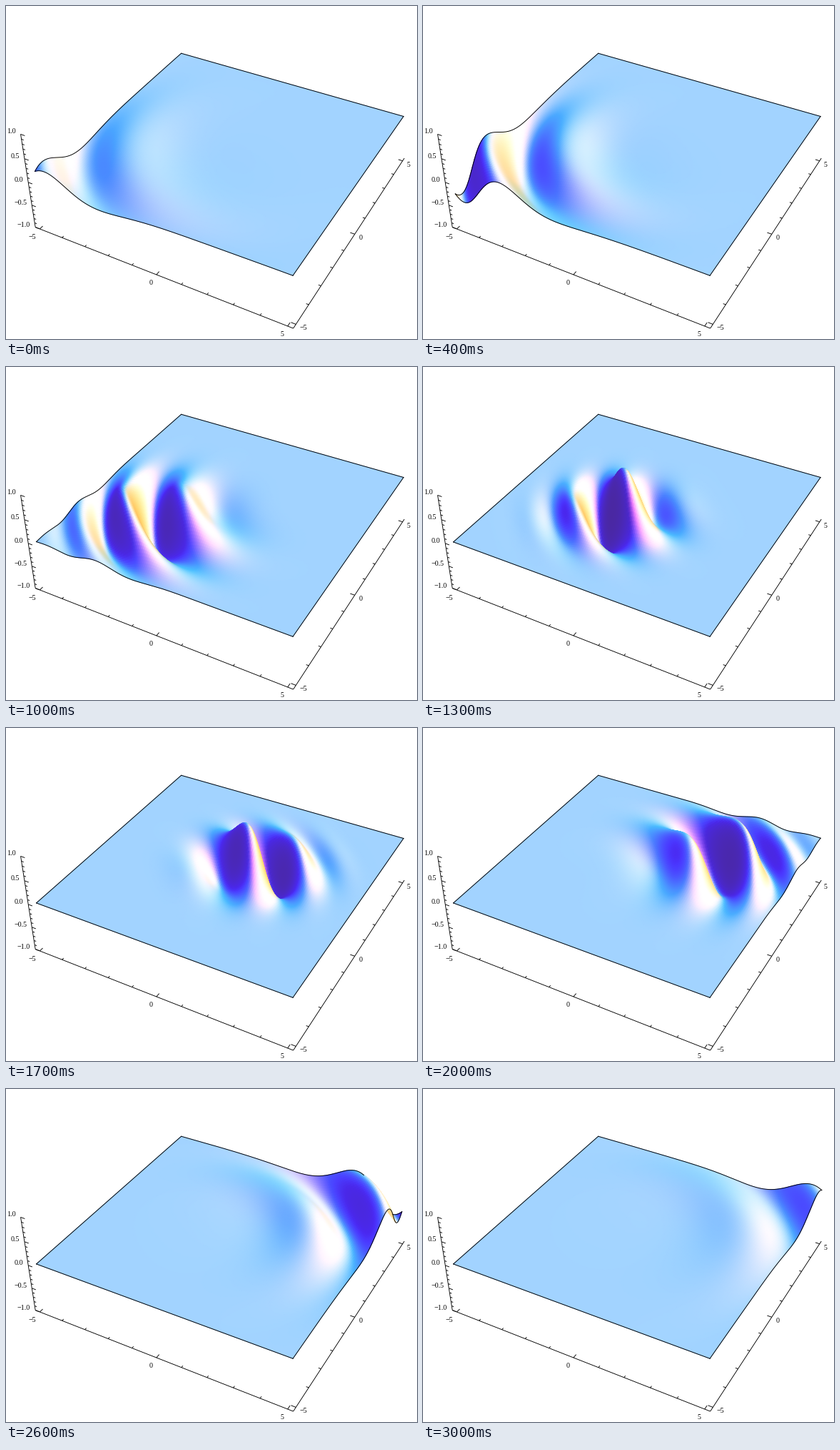
These frames come from a looping animation (576x466 px, 3100 ms). A matplotlib script:

```python
import numpy as np
import matplotlib.pyplot as plt
from matplotlib.animation import FuncAnimation

W, H, DPI = 576, 466, 64
PX = 72 / DPI                       # points per pixel
FRAMES, INTERVAL = 31, 100
K = 2.0                             # wave number along x and along y
SPAN, Z_HALF = 10.4, 0.2            # padded axis range, half box height

# Perspective camera, in units of the box
EYE = np.array([1.3, -2.4, 2.0])
DIST = np.linalg.norm(EYE)
TOWARD = EYE / DIST
RIGHT = np.cross([0, 0, 1], TOWARD)
RIGHT /= np.linalg.norm(RIGHT)
UP = np.cross(TOWARD, RIGHT)
SCALE, CX, CY = 1333, 311.2, 197.1

# Lights are fixed to the view: direction (right, up, toward the eye) and colour
AMBIENT = np.array([0.29, 0.157, 0.23])
LIGHTS = [
    ((1.5, -0.5, 1.5), (1.56, 0.12, 0.0)),
    ((1.5, 1.5, 1.5), (0.0, 0.80, 0.25)),
    ((-0.5, 1.5, 1.5), (0.0, 0.0, 0.95)),
]


def project(p):
    """Box coordinates to pixels."""
    p = np.asarray(p, float)
    depth = DIST - p @ TOWARD
    return CX + SCALE * (p @ RIGHT) / depth, CY - SCALE * (p @ UP) / depth


def to_box(x, y, z):
    return np.stack([x / SPAN, y / SPAN, z * Z_HALF], axis=-1)


def packet(x, y, t):
    """Free Gaussian wave packet, narrowest at t = 0."""
    spread = 1 + 1j * t
    u, v = x - K * t, y - K * t
    return np.exp(-(u**2 + v**2) / (2 * spread)
                  + 1j * (K * (x + y) - K**2 * t)) / spread


def shade(x, y, t, psi):
    spread = 1 + 1j * t
    steep = Z_HALF * SPAN
    hx = steep * (psi * (1j * K - (x - K * t) / spread)).real
    hy = steep * (psi * (1j * K - (y - K * t) / spread)).real
    n = np.stack([-hx, -hy, np.ones_like(hx)], axis=-1)
    n /= np.linalg.norm(n, axis=-1, keepdims=True)
    n = n @ np.stack([RIGHT, UP, TOWARD], axis=1)
    rgb = np.tile(AMBIENT, hx.shape + (1,))
    for direction, colour in LIGHTS:
        d = np.array(direction) / np.linalg.norm(direction)
        rgb += np.maximum(n @ d, 0)[..., None] * np.array(colour)
    return np.clip(rgb, 0, 1)


def hidden(x, y, z, t):
    """True where the surface stands between a point and the eye."""
    s = np.linspace(0.002, 0.2, 60)[:, None]
    ex, ey, ez = EYE[0] * SPAN, EYE[1] * SPAN, EYE[2] / Z_HALF
    rx, ry, rz = x + s * (ex - x), y + s * (ey - y), z + s * (ez - z)
    inside = (np.abs(rx) < 5) & (np.abs(ry) < 5)
    return (inside & (packet(rx, ry, t).real > rz + 0.005)).any(axis=0)


fig = plt.figure(figsize=(W / DPI, H / DPI), dpi=DPI, facecolor="white")
ax = fig.add_axes([0, 0, 1, 1])
ax.set_xlim(-0.5, W - 0.5)
ax.set_ylim(H - 0.5, -0.5)
ax.axis("off")


def segment(a, b):
    (x0, y0), (x1, y1) = project(a), project(b)
    ax.plot([x0, x1], [y0, y1], color="black", lw=0.9 * PX,
            solid_capstyle="butt")


def label(text, p, dx, dy, ha):
    x, y = project(p)
    ax.text(x + dx, y + dy + 3.4, text.replace("-", "\u2212"), ha=ha,
            va="baseline", family="Liberation Serif", fontsize=10 * PX)


def tick(p, direction, major):
    p = np.array(p)
    segment(p, p + (0.017 if major else 0.009) * np.array(direction))


def draw_axes():
    segment((-0.5, -0.5, -0.2), (0.5, -0.5, -0.2))
    segment((0.5, -0.5, -0.2), (0.5, 0.5, -0.2))
    segment((-0.5, -0.5, -0.2), (-0.5, -0.5, 0.2))
    for v in range(-5, 6):
        major = v % 5 == 0
        px, py = (v / SPAN, -0.5, -0.2), (0.5, v / SPAN, -0.2)
        tick(px, (0, 1, 0), major)
        tick(py, (-1, 0, 0), major)
        if major:
            label(str(v), px, -10.5 if v < 0 else -8, 11, "center")
            label(str(v), py, 5.5, 4.6, "left")
    for i in range(-10, 11):
        p = (-0.5, -0.5, i / 10 * Z_HALF)
        tick(p, (1, 0, 0), i % 5 == 0)
        if i % 5 == 0:
            label(f"{i / 10:.1f}", p, -7, -4.4, "right")


draw_axes()

# Rows and columns run from far to near, so nearer cells cover farther ones
N = 121
GX, GY = np.meshgrid(np.linspace(-5, 5, N), np.linspace(5, -5, N))

RUN = np.linspace(-5, 5, 201)
END = np.full_like(RUN, 5.0)
EDGES = [(RUN, END), (RUN, -END), (END, RUN), (-END, RUN)]
rims = [ax.plot([], [], color="black", lw=0.95 * PX, zorder=3)[0]
        for _ in EDGES]
surface = []


def draw(frame):
    t = (frame - 15) * 0.2
    while surface:
        surface.pop().remove()
    psi = packet(GX, GY, t)
    sx, sy = project(to_box(GX, GY, psi.real))
    surface.append(ax.pcolormesh(sx, sy, shade(GX, GY, t, psi),
                                 shading="gouraud", zorder=1))
    for rim, (x, y) in zip(rims, EDGES):
        z = packet(x, y, t).real
        ex, ey = project(to_box(x, y, z))
        ex[hidden(x, y, z, t)] = np.nan
        rim.set_data(ex, ey)
    return surface + rims


anim = FuncAnimation(fig, draw, frames=FRAMES, interval=INTERVAL,
                     repeat=True, repeat_delay=0, blit=False)
plt.show()
```
